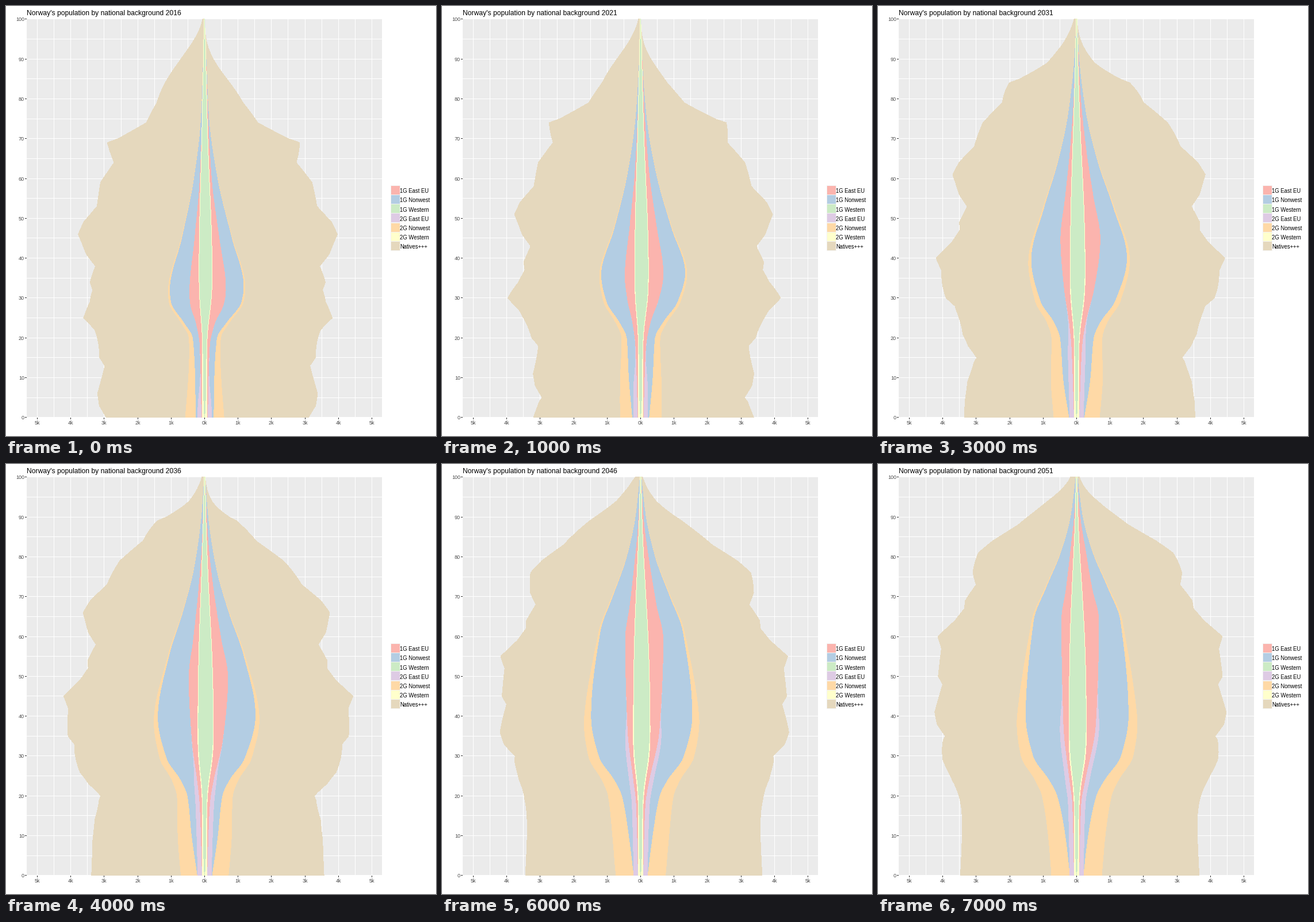
A matplotlib script that plays this animation: 748x748 px, repeating every 8 s.

```python
import numpy as np
import matplotlib.pyplot as plt
from matplotlib.animation import FuncAnimation
from matplotlib.patches import Rectangle

plt.rcParams["font.family"] = "Liberation Sans"

SIZE, DPI = 748, 72
LEFT, RIGHT, TOP, BOTTOM = 36, 654, 22, 716
CX, PER_K, PER_YEAR = 345, 58.2, 6.93
FIRST, LAST, STEP = 2016, 2051, 5

GROUPS = [
    ("1G East EU", "#FBB4AE"), ("1G Nonwest", "#B3CDE3"),
    ("1G Western", "#CCEBC5"), ("2G East EU", "#DECBE4"),
    ("2G Nonwest", "#FED9A6"), ("2G Western", "#FFFFCC"),
    ("Natives+++", "#E5D8BD"),
]
STACK = [6, 4, 1, 3, 0, 5, 2]  # from the outer edge to the middle

AGE = np.arange(101)

# Peak width in pixels of the people born in a year
BIRTHS = [
    (1916, 140), (1927, 119), (1937, 109), (1942, 117), (1946, 164),
    (1947, 183), (1952, 164), (1957, 185), (1963, 189), (1967, 212),
    (1970, 221), (1972, 215), (1975, 207), (1978, 192), (1982, 205),
    (1984, 204), (1987, 218), (1991, 246), (1994, 238), (2001, 242),
    (2003, 234), (2007, 242), (2010, 248), (2013, 245), (2016, 233),
    (2017, 238), (2022, 251), (2027, 256), (2037, 259), (2051, 264),
]
MIGRANT_GAIN = 62

# (age, width) points that drift as the immigrants grow older
NONWEST = {
    2016: [(0, 15), (10, 16), (20, 20), (24, 36), (29, 58), (32, 60),
           (45, 39), (60, 18), (75, 6), (90, 2), (100, 0)],
    2026: [(0, 13), (10, 24), (20, 27), (24, 37), (29, 59), (39.5, 76),
           (50, 51), (62, 27), (75, 11), (90, 2), (100, 0)],
    2051: [(0, 11), (10, 19), (20, 33), (24, 47), (30, 75), (40, 88),
           (64, 74), (72, 53), (81, 27), (90, 10), (100, 1)],
}
EAST = {
    2016: [(0, 5), (18, 8), (24, 15), (28, 24), (31, 26), (45, 17),
           (60, 8), (80, 3), (100, 0)],
    2026: [(0, 4), (18, 9), (24, 13), (31, 21), (40, 28), (51, 20),
           (64, 11), (80, 4), (100, 0)],
    2051: [(0, 4), (18, 7), (24, 12), (38, 22.5), (64, 26), (72, 18),
           (82, 10), (90, 4), (100, 0)],
}


def rise(x, middle, width):
    return 1 / (1 + np.exp(-(x - middle) / width))


def smooth(points):
    """Monotone cubic curve through the points, at every age."""
    x, y = np.transpose(points)
    step = np.diff(x)
    slope = np.diff(y) / step
    a, b = slope[:-1], slope[1:]
    inner = np.zeros(len(a))
    same = a * b > 0
    inner[same] = 2 * a[same] * b[same] / (a[same] + b[same])
    m = np.concatenate([slope[:1], inner, slope[-1:]])
    i = np.clip(np.searchsorted(x, AGE, side="right") - 1, 0, len(step) - 1)
    h, u = step[i], (AGE - x[i]) / step[i]
    return (y[i] * (1 + 2 * u) * (1 - u) ** 2 + y[i + 1] * u * u * (3 - 2 * u)
            + h * u * (1 - u) * (m[i] * (1 - u) - m[i + 1] * u))


def drift(keys, year):
    years = list(keys)
    points = np.array([keys[k] for k in years], float)
    mixed = [[np.interp(year, years, points[:, n, axis]) for axis in (0, 1)]
             for n in range(points.shape[1])]
    return smooth(mixed)


def survival(age):
    return np.exp(-0.51 * np.exp((age - 84) / 8))


def half_pyramid(year, men):
    """Distances from the middle of all layer edges, outermost first."""
    passed = year - FIRST
    t = passed / (LAST - FIRST)
    born = year - AGE

    size = np.interp(born, *np.transpose(BIRTHS))
    size = size - MIGRANT_GAIN * (1 - rise(AGE, 26, 3.5))
    ageing = 5.5 - 0.17 * passed if men else -0.07 * passed
    alive = survival(AGE + ageing)
    total = size * alive * (1.055 if men else 1)

    blue, red = drift(NONWEST, year), drift(EAST, year)
    if men:
        blue = blue * (1.02 + 0.2 * (1 - t) * rise(AGE, 32, 6))
        red = red * (1 + 0.48 * rise(AGE, 25, 4))
    peak, middle = (11 + 3 * t, 58 + 12 * t) if men else (7 + 3 * t, 60 + 12 * t)
    green = 2.3 * (1 - np.exp(-AGE / 4))
    green = green + peak * rise(AGE, 26, 3) * rise(-AGE, -middle, 9)
    green = green * rise(-AGE, -88, 5)
    young = np.interp(AGE, [0, 20, 30], [4.2, 4.2, 0])
    yellow = np.maximum(green + 1 + t * np.exp(-((AGE - 28) / 10) ** 2), young)
    red = np.maximum(red, yellow)
    purple = red + 7.5 * rise(born, 2010, 2.3)
    blue = np.maximum(blue, purple)
    orange = blue + 34 * rise(born, 2014, 13) * alive
    edges = np.array([total, orange, blue, purple, red, yellow, green])
    return np.minimum(edges, total)


def box(x, y, w, h, color):
    ax.add_patch(Rectangle((x, y), w, h, fc=color, lw=0, antialiased=False, zorder=0))


fig = plt.figure(figsize=(SIZE / DPI, SIZE / DPI), dpi=DPI, facecolor="white")
ax = fig.add_axes([0, 0, 1, 1])
ax.set(xlim=(0, SIZE), ylim=(SIZE, 0))
ax.axis("off")

box(LEFT, TOP, RIGHT - LEFT, BOTTOM - TOP, "#EBEBEB")
for half in range(-10, 11):
    x = round(CX + half * PER_K / 2)
    box(x, TOP, 1, BOTTOM - TOP, "white")
    if half % 2 == 0:
        box(x, BOTTOM, 1, 3, "#333333")
        ax.text(x + 0.5, 728, f"{abs(half) // 2}k", size=9, color="#4D4D4D", ha="center")
for age in range(0, 101, 5):
    y = round(715.3 - PER_YEAR * age)
    box(LEFT, y, RIGHT - LEFT, 1, "white")
    if age % 10 == 0:
        box(LEFT - 3, y, 3, 1, "#333333")
        ax.text(32, y + 4, str(age), size=9, color="#4D4D4D", ha="right")
box(669, 312, 17, 114, "#F2F2F2")
for i, (name, color) in enumerate(GROUPS):
    box(670, round(313 + 16.15 * i), 15, 15, color)
    ax.text(685.5, 325.3 + 16.1 * i, name, size=9.5, color="black")

title = ax.text(36, 16, "", size=12.1, color="black")
layers = [ax.fill([0, 0, 0], [0, 0, 0], fc=GROUPS[g][1], lw=0,
                  antialiased=False, zorder=2 + n)[0]
          for n, g in enumerate(STACK)]
ys = 715.8 - PER_YEAR * AGE


def draw(i):
    year = FIRST + STEP * i
    title.set_text(f"Norway's population by national background {year}")
    middle = CX + 0.5
    women, men = half_pyramid(year, False), half_pyramid(year, True)
    for layer, l, r in zip(layers, women, men):
        xs = np.concatenate([middle - l, (middle + r)[::-1]])
        layer.set_xy(np.column_stack([xs, np.concatenate([ys, ys[::-1]])]))
    return [title, *layers]


count = (LAST - FIRST) // STEP + 1
anim = FuncAnimation(fig, draw, frames=count, interval=1000, repeat=True, blit=False)
plt.show()
```
